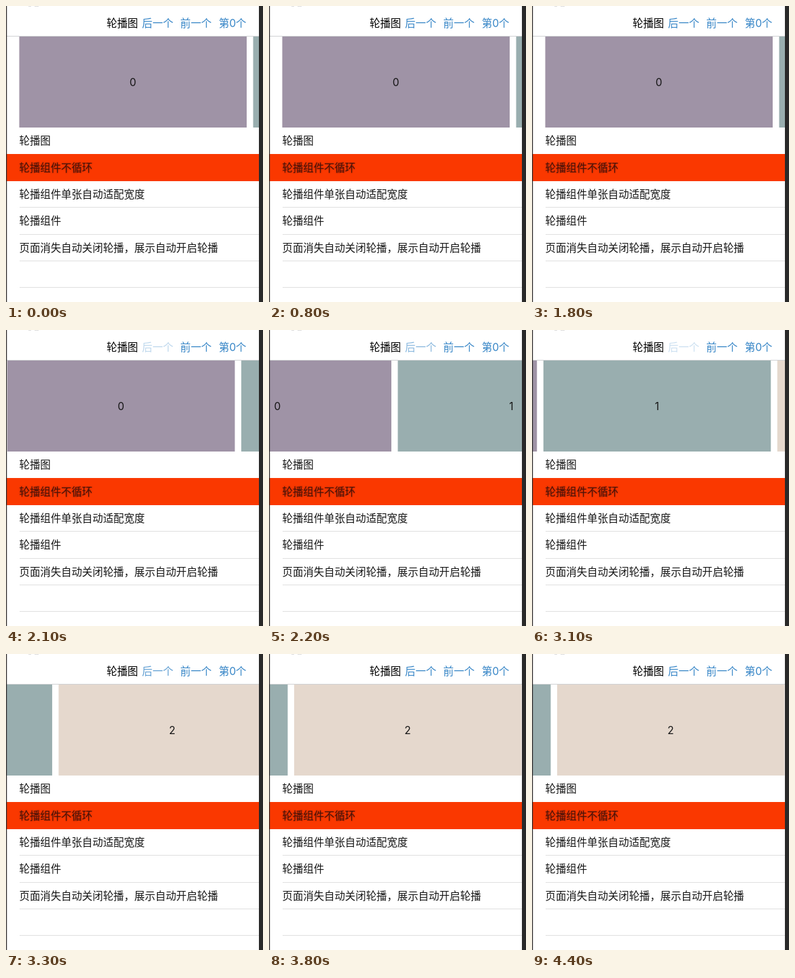
Write an HTML page that moves like this. It is 378x436 px and loops after 4500 ms.

```html
<!DOCTYPE html>
<html lang="zh-CN">
<head>
<meta charset="utf-8">
<title>轮播图</title>
<style>
  html, body { margin: 0; width: 100%; height: 100%; overflow: hidden; background: #fff; }
  svg { display: block; width: 378px; height: 436px; }
  text { font: 15.4px Inter, "Noto Sans CJK SC", "Noto Sans CJK", sans-serif; fill: #151515; }
  .title { font-weight: 500; fill: #000; }
  .link { fill: #3484c6; }
  .num { text-anchor: middle; }
  .hot { fill: #4a1208; }
  .halo { fill: #64180a; opacity: .6; filter: blur(1.3px); }
</style>
</head>
<body>
<svg viewBox="0 0 378 436">
  <defs><clipPath id="view"><rect x="1" y="45" width="371" height="134"/></clipPath></defs>
  <rect width="378" height="436" fill="#fff"/>
  <path d="M33 0h4M42 0h6" stroke="#bbb"/>
  <path d="M1 44.5H372" stroke="#d0d2d4"/>
  <text class="title" x="148" y="30.8">轮播图</text>
  <text class="link" id="next" x="200" y="30.8">后一个</text>
  <text class="link" x="256.3" y="30.8">前一个</text>
  <text class="link" x="313" y="30.8">第0个</text>
  <g clip-path="url(#view)"><g id="track"></g></g>
  <rect x="1" y="218" width="371" height="40" fill="#fa3800"/>
  <g id="list"></g>
  <rect width="1.3" height="436" fill="#34302f"/>
  <rect x="372" width="6" height="436" fill="#292929"/>
</svg>
<script>
const LOOP = 4500, PITCH = 344, MAX = 670.5, SLIDE = 290;
const HOLD = 130, FADE = 300;
const TAPS = [2055, 3082, 4085];
const COLORS = ['#9f93a6', '#99aeaf', '#e5d8cd'];
const ROWS = ['轮播图', '轮播组件不循环', '轮播组件单张自动适配宽度', '轮播组件', '页面消失自动关闭轮播，展示自动开启轮播', ''];

const $ = id => document.getElementById(id);
const track = $('track'), next = $('next');

track.innerHTML = COLORS.map((c, i) => {
  const x = 19.5 + i * PITCH;
  return `<rect x="${x}" y="45" width="334.5" height="134" fill="${c}"/>
    <text class="num" x="${x + 167}" y="117.7">${i}</text>`;
}).join('');

$('list').innerHTML = ROWS.map((label, i) => {
  const y = 198.3 + i * 39.4;
  const text = cls => `<text class="${cls}" x="19.5" y="${y + 5.8}">${label}</text>`;
  const line = i > 1 ? `<path d="M20 ${Math.round(y + 19) + .5}H372" stroke="#e0e0e0"/>` : '';
  return (i === 1 ? text('halo') + text('hot') : text('')) + line;
}).join('');

const clamp = v => Math.min(1, Math.max(0, v));

// cubic-bezier(.42, 0, .58, 1)
function ease(x) {
  if (x <= 0 || x >= 1) return clamp(x);
  let lo = 0, hi = 1;
  for (let i = 0; i < 24; i++) {
    const s = (lo + hi) / 2, q = 1 - s;
    const bx = 1.26 * q * q * s + 1.74 * q * s * s + s * s * s;
    if (bx < x) lo = s; else hi = s;
  }
  return lo * lo * (3 - 2 * lo);
}

function tapAlpha(t) {
  for (const up of TAPS) {
    if (t >= up - HOLD && t < up + FADE) return .2 + .8 * clamp((t - up) / FADE);
  }
  return 1;
}

function draw(t) {
  const move = i => ease((t - TAPS[i]) / SLIDE);
  const offset = PITCH * move(0) + (MAX - PITCH) * move(1);
  track.setAttribute('transform', `translate(${-offset} 0)`);
  next.setAttribute('opacity', tapAlpha(t));
}

const start = performance.now();
function tick() {
  draw((performance.now() - start) % LOOP);
  requestAnimationFrame(tick);
}
tick();
</script>
</body>
</html>
```
